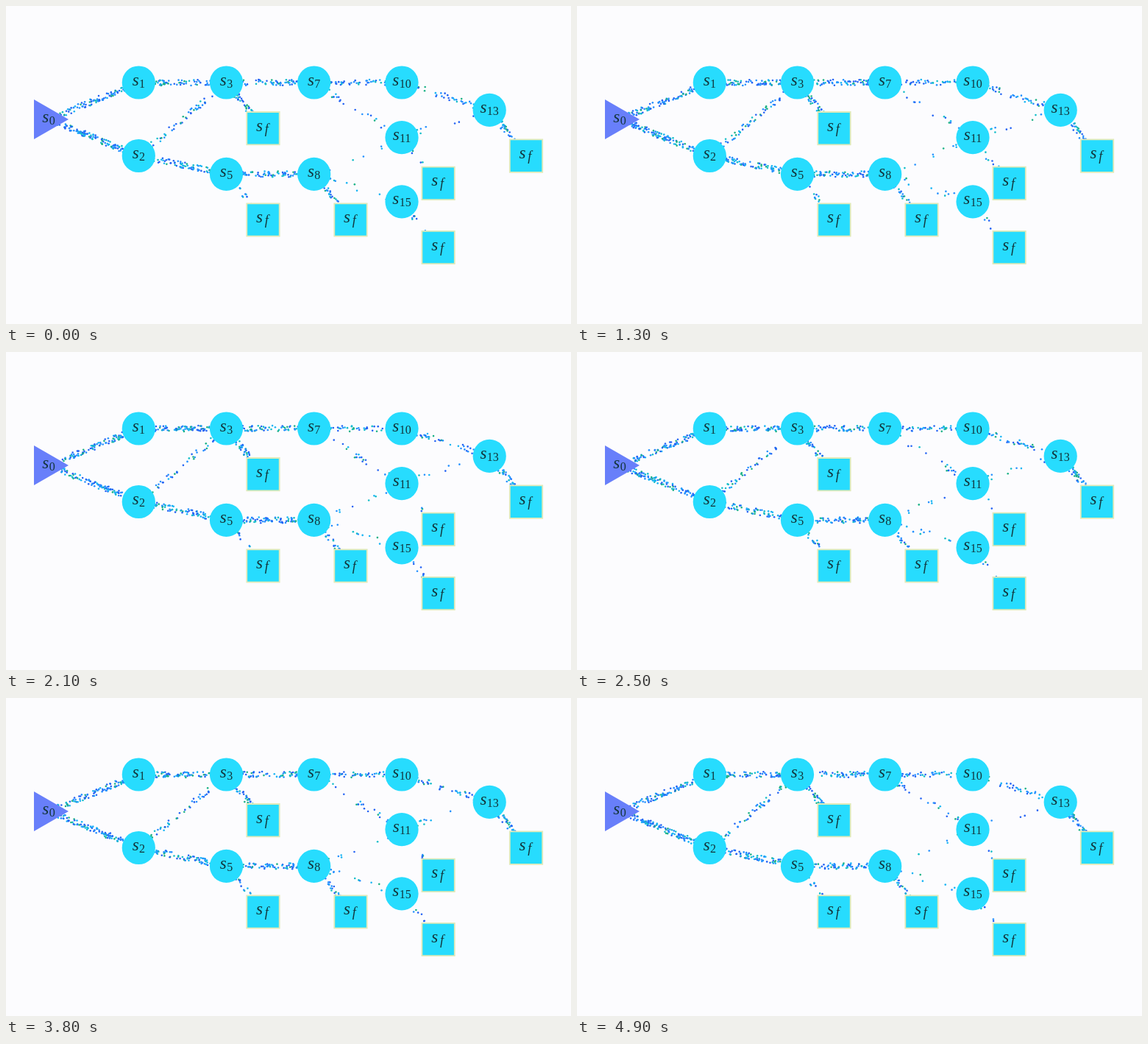
An HTML page with a canvas for the animation above (5 s loop, 768 px wide and 432 px high).

```html
<!DOCTYPE html>
<html lang="en">
<head>
<meta charset="utf-8">
<title>State flow</title>
<style>
  html, body { margin: 0; width: 100%; height: 100%; overflow: hidden; background: #fcfcfe; }
  canvas { display: block; }
</style>
</head>
<body>
<canvas id="stage" width="768" height="432"></canvas>
<script>
const ctx = document.getElementById('stage').getContext('2d');
const LOOP = 5000, STEP = 100;
const COLORS = ['#2463f4', '#2463f4', '#2490ff', '#2490ff', '#18b4f4', '#12bdc8', '#1cb286'];
const FACE = '"Liberation Serif", "Times New Roman", serif';

// Each node: [x, y, subscript]
const nodes = {
  0: [58, 154, '0'], 1: [180.3, 104, '1'], 2: [180.3, 203.5, '2'],
  3: [299.5, 104, '3'], 5: [299.5, 228.4, '5'],
  7: [418.7, 104, '7'], 8: [418.7, 228.4, '8'],
  10: [538, 104, '10'], 11: [538, 178.7, '11'],
  15: [538, 265.8, '15'], 13: [657.2, 141.4, '13'],
  a: [349.5, 166.2, 'f'], b: [349.5, 290.5, 'f'], c: [468.5, 290.5, 'f'],
  d: [587.6, 240.9, 'f'], e: [587.6, 328, 'f'], g: [707, 203.6, 'f']
};

// Each edge: [from, to, number of dots]
const edges = [
  [0, 1, 112], [0, 2, 135], [1, 3, 104], [2, 3, 56], [2, 5, 96],
  [3, 7, 78], [3, 'a', 66], [5, 'b', 22], [5, 8, 92], [7, 10, 52],
  [7, 11, 22], [8, 'c', 40], [8, 11, 11], [8, 15, 14], [10, 13, 44],
  [11, 13, 13], [11, 'd', 10], [15, 'e', 14], [13, 'g', 66]
];

let seed = 71;
function random() {
  seed = (seed * 16807) % 2147483647;
  return seed / 2147483647;
}

const dots = edges.flatMap(([from, to, count]) => {
  const [x, y] = nodes[from], [x2, y2] = nodes[to];
  const dx = x2 - x, dy = y2 - y, len = Math.hypot(dx, dy);
  return Array.from({ length: count }, () => {
    const side = (random() - 0.5) * 8 / len;
    return {
      x: x - dy * side, y: y + dx * side, dx, dy,
      phase: random(),
      trips: random() < 0.6 ? 3 : 4,
      color: COLORS[Math.floor(random() * COLORS.length)]
    };
  });
});

function drawDot(dot, t) {
  const u = (dot.phase + dot.trips * t) % 1;
  ctx.fillStyle = dot.color;
  ctx.beginPath();
  ctx.arc(dot.x + dot.dx * u, dot.y + dot.dy * u, 1.3, 0, Math.PI * 2);
  ctx.fill();
}

function drawLabel(x, y, sub) {
  const isF = sub === 'f';
  const main = `italic 23px ${FACE}`;
  const small = `${isF ? 'italic 18px' : '16px'} ${FACE}`;
  ctx.fillStyle = '#12343a';
  ctx.font = main;
  const subLeft = ctx.measureText('s').width + (isF ? 2.8 : 0.3);
  ctx.font = small;
  const left = x - (subLeft + ctx.measureText(sub).width) / 2 - (isF ? 1 : 0);
  ctx.fillText(sub, left + subLeft, y + 6.5);
  ctx.font = main;
  ctx.fillText('s', left, y + 3.5);
}

function drawNode([x, y, sub]) {
  ctx.fillStyle = sub === '0' ? '#687ffa' : '#27dcfe';
  ctx.beginPath();
  if (sub === '0') {
    ctx.moveTo(38, 127);
    ctx.lineTo(85, 154);
    ctx.lineTo(38, 181);
    ctx.fill();
  } else if (sub === 'f') {
    ctx.rect(x - 22.2, y - 22.2, 44.4, 44.4);
    ctx.fill();
    ctx.strokeStyle = '#e0eab8';
    ctx.lineWidth = 1.8;
    ctx.stroke();
  } else {
    ctx.arc(x, y, 22.6, 0, Math.PI * 2);
    ctx.fill();
  }
  drawLabel(x, y, sub);
}

function draw(now) {
  const t = Math.floor(now % LOOP / STEP) * STEP / LOOP;
  ctx.fillStyle = '#fcfcfe';
  ctx.fillRect(0, 0, 768, 432);
  dots.forEach(dot => drawDot(dot, t));
  Object.values(nodes).forEach(drawNode);
  requestAnimationFrame(draw);
}

requestAnimationFrame(draw);
</script>
</body>
</html>
```
